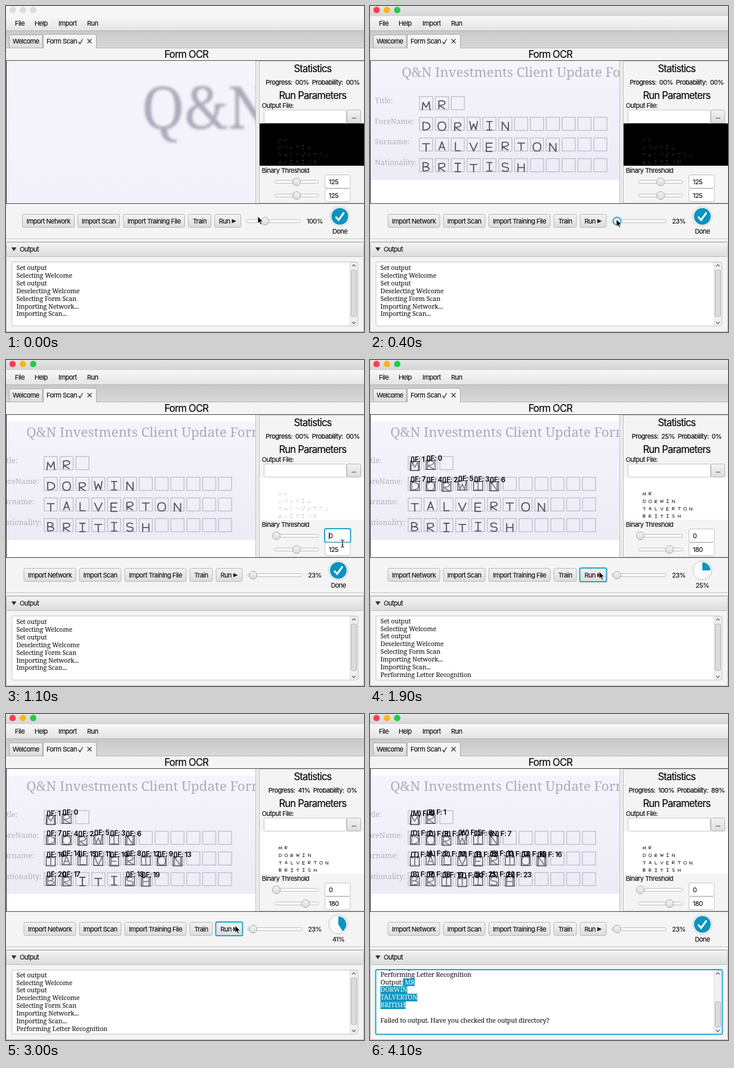
These frames come from a looping animation (600x547 px, 4200 ms). An HTML page:

```html
<!DOCTYPE html>
<html lang="en">
<head>
<meta charset="utf-8">
<title>Form OCR</title>
<style>
html, body { margin: 0; width: 100%; height: 100%; overflow: hidden; background: #f4f4f4; }
svg { display: block; width: 600px; height: 547px; }
text { font: 11px Inter, sans-serif; letter-spacing: -.05em; fill: #111; stroke: #111; stroke-width: .15px; white-space: pre; }
.head { font-size: 16.6px; fill: #000; }
.stat { word-spacing: 2.4px; fill: #000; }
.mid { text-anchor: middle; }
.out { font: 10.7px "Noto Serif", serif; letter-spacing: -.1px; fill: #2a2a2a; }
.sel { fill: #fff; stroke: none; }
.form { font: 12.6px "Noto Serif", serif; letter-spacing: 0; fill: #b2b0c0; stroke: none; }
.title { font: 22.5px "Noto Serif", serif; letter-spacing: -.1px; fill: #adabba; stroke: none; }
.tag { font-size: 11.7px; font-weight: 600; fill: #000; stroke: none; }
</style>
</head>
<body>
<svg viewBox="0 0 600 547">
  <defs>
    <linearGradient id="bar" x2="0" y2="1"><stop stop-color="#f8f8f8"/><stop offset="1" stop-color="#e4e4e4"/></linearGradient>
    <linearGradient id="top" x2="0" y2="1"><stop stop-color="#e6e5e6"/><stop offset="1" stop-color="#d6d5d6"/></linearGradient>
    <linearGradient id="btn" x2="0" y2="1"><stop stop-color="#f3f3f3"/><stop offset="1" stop-color="#dcdcdc"/></linearGradient>
    <linearGradient id="tabs" x2="0" y2="1"><stop stop-color="#c9c9c9"/><stop offset="1" stop-color="#d8d8d8"/></linearGradient>
    <linearGradient id="paper" x2="0" y2="1"><stop stop-color="#f5f4fb"/><stop offset="1" stop-color="#edebf5"/></linearGradient>
    <filter id="soft"><feGaussianBlur stdDeviation=".5"/></filter>
    <clipPath id="view"><path d="M1 92H418V331H1Z"/></clipPath>
    <clipPath id="log"><path d="M11 430H576V536H11Z"/></clipPath>
    <clipPath id="mini"><path d="M425 197H600V268H425Z"/></clipPath>
  </defs>
  <g id="base"></g>
  <g id="live"></g>
  <text id="ruler" class="out" visibility="hidden"></text>
</svg>
<script>
const $ = id => document.getElementById(id);
const BLUE = '#0c93bf', FOCUS = '#1fa6ce', EDGE = '#b6b6b6';

const text = (x, y, s, cls = '') => `<text x="${x}" y="${y}" class="${cls}">${s.replace(/&/g, '&amp;')}</text>`;
const rect = (x, y, w, h, fill, stroke = 'none', r = 0, sw = 1) =>
  `<rect x="${x}" y="${y}" width="${w}" height="${h}" fill="${fill}" stroke="${stroke}" rx="${r}" stroke-width="${sw}"/>`;
const path = (d, fill, stroke = 'none', sw = 1, more = '') =>
  `<path d="${d}" fill="${fill}" stroke="${stroke}" stroke-width="${sw}" ${more}/>`;
const disc = (x, y, r, fill, stroke = 'none', sw = 1) =>
  `<circle cx="${x}" cy="${y}" r="${r}" fill="${fill}" stroke="${stroke}" stroke-width="${sw}"/>`;
const group = (attrs, body) => `<g ${attrs}>${body}</g>`;

// A control's outline; the focus ring sits just outside it
const frame = (x, y, w, h, fill, edge, focused) => focused
  ? rect(x - .5, y - .5, w + 1, h + 1, fill, FOCUS, 2.5, 2)
  : rect(x, y, w, h, fill, edge, 2.5);

// Piecewise linear value from [step, a, b, ...] keys
function tween(keys, f) {
  let i = 0;
  while (i < keys.length - 2 && keys[i + 1][0] <= f) i++;
  const [a, b] = [keys[i], keys[i + 1]];
  const u = Math.min(1, Math.max(0, (f - a[0]) / (b[0] - a[0])));
  return a.slice(1).map((v, n) => v + (b[n + 1] - v) * u);
}

const GLYPHS = {
  M: 'M0 12L1 1 5 8 9 0 10 12', R: 'M1 12V1Q9-1 9 4 8 7 1 7L9 12',
  D: 'M1 12V1Q10 1 10 6.5T1 12', O: 'M5 0Q0 0 0 6T5 12 10 6 5 0',
  W: 'M0 0L2 12 5 4 8 12 10 0', I: 'M1 0H9M5 0V12M1 12H9',
  N: 'M1 12V0L9 12V0', T: 'M0 1H10M5 1V12', A: 'M1 12L5 0 9 12M2 8H8',
  L: 'M2 0V12H9', V: 'M0 0L5 12 10 0', E: 'M9 0H1V12H9M1 6H8',
  B: 'M1 12V0Q8 0 8 3T1 6Q9 6 9 9T1 12', H: 'M1 0V12M9 0V12M1 6H9',
  S: 'M9 2Q7 0 5 0 1 0 1 3 1 6 5 6 9 6 9 9 9 12 5 12 2 12 1 10'
};
const ROWS = [['Title:', 'MR', 3], ['ForeName:', 'DORWIN', 12], ['Surname:', 'TALVERTON', 12], ['Nationality:', 'BRITISH', 12]];
const FOUND = [1, 0, 7, 4, 2, 5, 3, 6, 16, 14, 15, 11, 10, 8, 12, 9, 13, 20, 17, 22, 23, 21, 18, 19];
const rowY = r => 152 + r * 34.7, colX = c => 83 + c * 26.55;
const LETTERS = ROWS.flatMap(([, word], r) => [...word].map((ch, c) => ({ ch, x: colX(c) + 4.5, y: rowY(r) + 6.5 })));
LETTERS.forEach((l, i) => { l.y += (3 - i * 7 % 4) * .7; l.found = FOUND[i]; l.index = i; });

const ink = (l, color, sw, dash = '') =>
  path(GLYPHS[l.ch], 'none', color, sw, `stroke-linejoin="round" stroke-dasharray="${dash}" transform="translate(${l.x} ${l.y}) scale(1.3 1.18)"`);

const formPrint = text(53, 119, 'Q&N Investments Client Update Form', 'title') +
  ROWS.map(([label, , n], r) => text(8, rowY(r) + 11, label, 'form') +
    Array.from({ length: n }, (_, c) => rect(colX(c), rowY(r), 22, 22, 'none', '#c1bfce', 0, 1.4)).join('')).join('');

const LOG = ['Set output', 'Selecting Welcome', 'Set output', 'Deselecting Welcome', 'Selecting Form Scan',
  'Importing Network...', 'Importing Scan...', 'Performing Letter Recognition',
  'Output:\u00a0MR', 'DORWIN', 'TALVERTON', 'BRITISH', '', 'Failed to output. Have you checked the output directory?'];

function measure(s) {
  $('ruler').textContent = s;
  return $('ruler').getComputedTextLength();
}

$('base').innerHTML =
  rect(0, 0, 600, 547, '#f4f4f4') + rect(0, 17, 600, 24, 'url(#bar)') +
  text(15, 32.5, 'File') + text(48, 32.5, 'Help') + text(88, 32.5, 'Import') + text(136, 32.5, 'Run') +
  rect(0, 41, 600, 29, 'url(#tabs)') + path('M0 41.5H600M0 70.5H600', 'none', '#b4b4b4') +
  path('M5.5 70V51Q5.5 48.5 8 48.5H58.5Q61 48.5 61 51V70', 'url(#btn)', '#a9a9a9') + text(11, 63, 'Welcome') +
  path('M62.5 71V50Q62.5 47.5 65 47.5H149Q151.5 47.5 151.5 50V71', '#f4f4f4', '#a9a9a9') + text(68, 63, 'Form Scan') +
  path('M121.5 60L124 63.5 128.5 55.5M136.5 55.5L143.5 62.5M143.5 55.5L136.5 62.5', 'none', '#333', 1.3) +
  text(302.3, 87, 'Form OCR', 'head mid') +
  rect(.5, 91.7, 610, 239.6, '#f4f4f4', '#222') +
  rect(1, 92.2, 417, 238.6, '#fff') +
  rect(418, 92.2, 6.5, 238.6, '#ececec') + path('M418.5 92V331M424.5 92V331', 'none', '#c0c0c0') +
  text(514, 111, 'Statistics', 'head mid') + text(514, 156, 'Run Parameters', 'head mid') +
  text(428.7, 171, 'Output File:') + rect(432.5, 174.5, 138, 22, '#fff', '#c4c4c4', 2) +
  rect(571.5, 174.5, 23, 22, 'url(#btn)', EDGE, 2) + text(583, 189, '...', 'mid') +
  text(428.7, 280, 'Binary Threshold') +
  path('M0 390.5H600M0 395.5H600', 'none', '#c4c4c4') +
  rect(.5, 396.5, 599, 24, 'url(#btn)', '#bcbcbc', 2) + path('M9 405H17.5L13.2 411.5Z', '#333') +
  text(23, 412, 'Output') + path('M.5 421V546.5H599.5V421', 'none', '#bcbcbc');

function slider(x, w, y, at, focused) {
  return rect(x, y - 2.5, w, 5, '#fbfbfb', '#bdbdbd', 2.5) +
    disc(at, y, 6.5, 'url(#btn)', focused ? FOCUS : '#a4a4a4', focused ? 1.8 : 1);
}

function button(x, w, s, focused) {
  const label = s === 'Run'
    ? text(x + 8, 364.5, s) + path(`M${x + 29.5} 357.5L${x + 37} 361 ${x + 29.5} 364.5Z`, '#1c1c1c')
    : text(x + w / 2, 364.5, s, 'mid');
  return frame(x + .5, 349.5, w - 1, 22, 'url(#btn)', EDGE, focused) + label;
}

function scan(f, zoom) {
  const [px, py] = tween([[4, 0, 0], [6, -19, 10]], f);
  const count = Math.floor(tween([[16, 0], [19, 8], [30, 21.01], [31, 24]], f)[0]);
  const read = tween([[32, 0], [33, 15], [34, 24]], f)[0];
  const isRead = l => l.index < read, tagged = l => isRead(l) || l.found < count;
  const tags = LETTERS.filter(tagged).map(l =>
    rect(l.x - 1, l.y - .5, 15, 15.5, 'none', '#222') +
    text(l.x - 1, l.y, isRead(l) ? `(${l.ch}) F: ${l.index}` : `()F: ${l.found}`, 'tag')).join('');
  const letters = LETTERS.map(l => ink(l, tagged(l) ? '#85848e' : '#5a5963', 1.5)).join('');
  return group('clip-path="url(#view)"',
    group(`transform="translate(${1 + px} ${93 + py}) scale(${zoom / 23}) translate(-1 -93)"`,
      rect(1, 93, 460, 199, 'url(#paper)') + group('filter="url(#soft)"', formPrint + letters) + tags));
}

function preview(low, high) {
  const dark = low >= 125;
  const gap = 7 * (180 - high) / 55;
  const dash = gap > .2 ? `1.6 ${gap} .8 ${gap * 1.7}` : '';
  return rect(425, 197, 175, 71, dark ? '#000' : '#fff') + group('clip-path="url(#mini)"',
    group('transform="translate(460 223.5) scale(.367 .36) translate(-94.5 -163.5)"',
      LETTERS.map(l => ink(l, dark ? '#ddd' : '#111', 1.8, dash)).join('')));
}

const percent = f => Math.round(tween([[16, 0], [19, 25], [30, 41], [32, 50], [34, 100]], f)[0]);

function progress(f, x) {
  if (f < 17 || f >= 34) {
    return disc(x, 353, 16.3, '#fafafa', '#c8c8c8') + disc(x, 353, 14, BLUE) +
      path(`M${x - 7} 353.5L${x - 2} 359 ${x + 7} 346.5`, 'none', '#fff', 3) + text(x, 382, 'Done', 'mid');
  }
  const p = percent(f), a = p / 50 * Math.PI, r = 13.5;
  return disc(x, 353, 16, '#fbfbfb', '#c0c0c0') +
    path(`M${x} 353V${353 - r}A${r} ${r} 0 ${p > 50 ? 1 : 0} 1 ${x + r * Math.sin(a)} ${353 - r * Math.cos(a)}Z`, BLUE) +
    text(x, 382, p + '%', 'mid');
}

function stats(f) {
  const prob = f < 33 ? 0 : f < 34 ? 88 : 89;
  const s = f < 17 ? 'Progress: 00% Probability: 00%' : `Progress: ${percent(f)}% Probability: ${prob}%`;
  return text(514, 132, s, 'stat mid');
}

function thresholds(low, high, focus) {
  const row = (v, y, on, field) => slider(450, 74, y, 453 + v * .272, on) +
    frame(534.5, y - 11.5, 42.5, 22, '#fff', '#c4c4c4', field) +
    text(541, y + 4, String(v)) + (field ? path(`M541.5 ${y - 6}V${y + 6}`, 'none', '#222') : '');
  return row(low, 295, focus === 'low', focus === 'field') + row(high, 318, focus === 'high', false);
}

function controls(f, zoom, focus) {
  const dx = zoom < 100 ? 2.5 : 0;
  return [[27, 88, 'Import Network'], [120, 71, 'Import Scan'], [196, 104, 'Import Training File'], [305, 39, 'Train'], [349, 45, 'Run']]
      .map(([x, w, s]) => button(x + dx, w, s, s === 'Run' && focus === 'run')).join('') +
    slider(402.5 + dx, 91.5, 361, 402 + dx + 9.5 + (zoom - 23) / 77 * 22.5, focus === 'zoom') +
    text(517.5, 365, Math.round(zoom) + '%', 'mid') + progress(f, 559.5 - dx);
}

function output(f, focused) {
  const done = f >= 34;
  const scroll = f < 17 ? 0 : tween([[33, 1.5], [34, 14.4], [36, 80], [37, 92.5]], f)[0];
  const lines = LOG.slice(0, f < 17 ? 7 : done ? 14 : 8);
  const picked = Math.max(0, f - 37);
  const body = lines.map((s, i) => {
    const y = 443.2 + i * 12.86 - scroll;
    if (i < 8 || i >= 8 + picked) return text(17.5, y, s, 'out');
    const cut = i === 8 ? 7 : 0, x = 17.5 + measure(s.slice(0, cut));
    return text(17.5, y, s.slice(0, cut), 'out') +
      rect(x, y - 10, measure(s.slice(cut)), 12.9, BLUE) + text(x, y, s.slice(cut), 'out sel');
  }).join('');
  const top = done ? 443 + scroll / 92.5 * 40 : 443, len = done ? 42 : 78;
  return frame(10, 429.5, 580, 107.5, '#fff', '#c4c4c4', focused) +
    group('clip-path="url(#log)"', body) +
    rect(576.5, 430.5, 12.5, 105.5, '#f0f0f0', '#dedede') + rect(578.5, top, 9, len, '#dcdcdc', '#b4b4b4', 2) +
    path('M580 437L583 434 586 437M580 530L583 533 586 530', 'none', '#666', 1.3);
}

const MOUSE = [[0, 422, 353], [1, 434, 359], [4, 413, 358], [5, 240, 205], [6, 230, 210], [7, 400, 260], [8, 487, 295],
  [10, 453, 296], [11, 564, 308], [12, 487, 318], [14, 502, 319], [15, 440, 345], [16, 384, 355], [30, 384, 355],
  [32, 380, 380], [34, 371, 414], [35, 200, 470], [36, 120, 470], [37, 57, 452], [38, 78, 452], [40, 80, 478]];

function cursor(f) {
  if (f > 40) return '';
  const [x, y] = tween(MOUSE, f);
  let shape;
  if (f === 11 || f > 34) {
    shape = path('M-3-6Q0-6 0-4 0-6 3-6M0-4V4M-3 6Q0 6 0 4 0 6 3 6M-1.5 2H1.5', 'none', '#222', 1.2);
  } else if (f > 32) {
    shape = path('M0 1Q1-1 2 1L4 6V4Q5.5 3 6 4.5 7.5 3.5 8 5 10 4 10.5 6L10 10 8.5 13H3L-3 8Q-3 6 0 7.5L1.5 8.5Z', '#fff', '#222', 1.1);
  } else {
    shape = path('M0 0V12L2.8 9.4 4.7 13.8 6.7 13 4.8 8.7H8.6Z', '#000', '#fff', .8);
  }
  return group(`transform="translate(${x} ${y})"`, shape);
}

function focusAt(f) {
  const steps = [[37, 'log'], [17, 'run'], [13, 'high'], [11, 'field'], [8, 'low'], [1, 'zoom'], [0, '']];
  return steps.find(s => f >= s[0])[1];
}

function titleBar(active) {
  const lights = active ? ['#fc3f4d', '#fdb41c', '#24cc48'] : Array(3).fill('#dcdcdc');
  return rect(0, 0, 600, 17, active ? 'url(#top)' : '#f6f6f6') +
    lights.map((c, i) => disc(11 + i * 17.3, 6.7, 5.4, c)).join('');
}

function render(f) {
  const focus = focusAt(f);
  const [zoom] = tween([[1, 100], [2, 72], [3, 40], [4, 23]], f);
  const low = Math.round(tween([[8, 125], [10, 0]], f)[0]);
  const high = Math.round(tween([[12, 125], [14, 180]], f)[0]);
  $('live').innerHTML = titleBar(f > 0) +
    scan(f, zoom) + stats(f) + preview(low, high) + thresholds(low, high, focus) +
    controls(f, zoom, focus) + output(f, focus === 'log') + cursor(f);
}

const start = performance.now();
let shown = -1;
function tick() {
  const f = Math.floor((performance.now() - start) % 4200 / 100);
  if (f !== shown) render(shown = f);
  requestAnimationFrame(tick);
}
tick();
</script>
</body>
</html>
```
